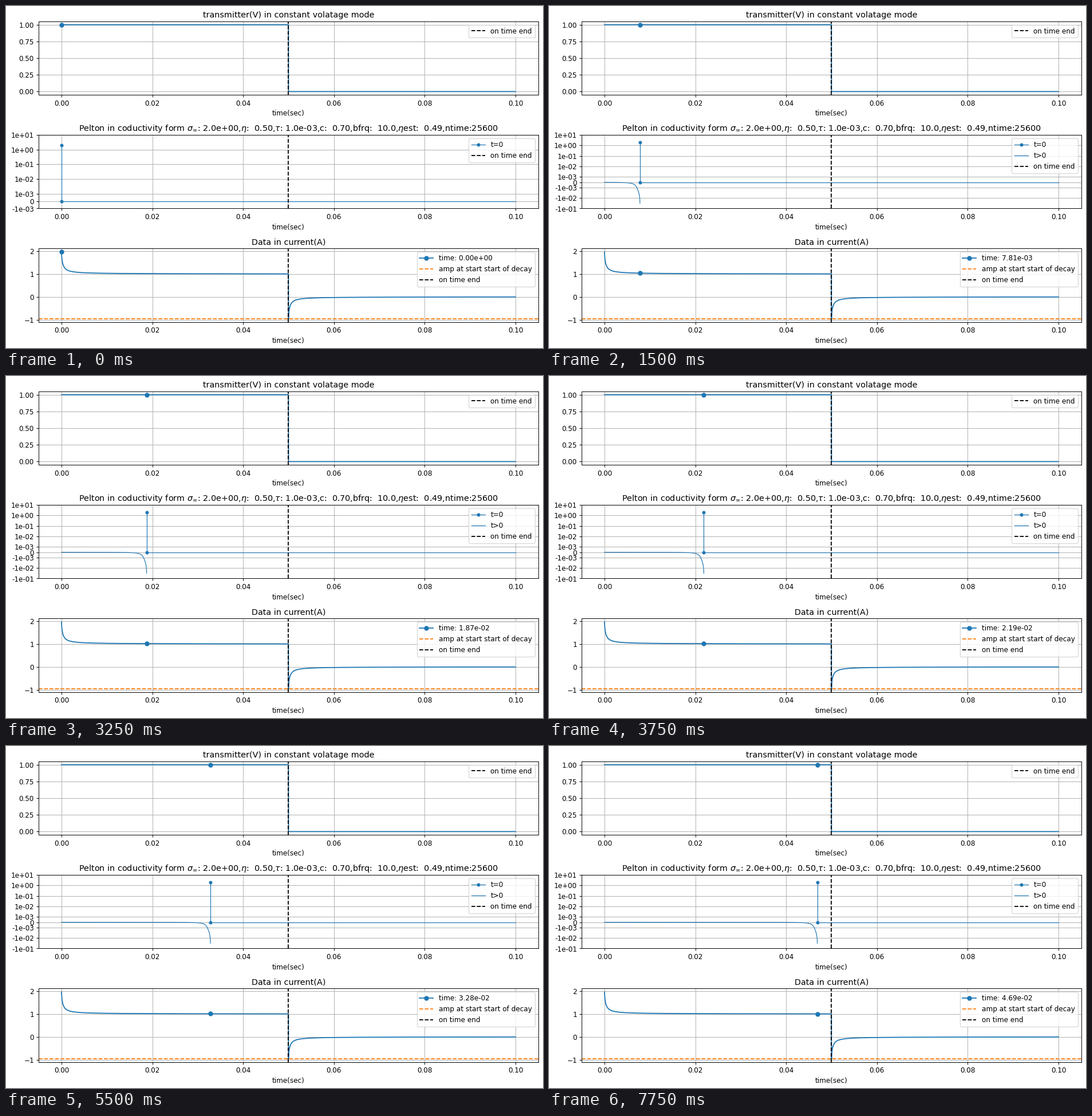
These frames come from a looping animation (938x597 px, 8000 ms). A matplotlib script:

```python
import numpy as np
import matplotlib.pyplot as plt
from matplotlib.animation import FuncAnimation
from matplotlib.ticker import FuncFormatter

WIDTH, HEIGHT, DPI = 938, 597, 86.2
FRAMES, INTERVAL = 32, 250

# Pelton model and sampling
SIGMA, ETA, TAU, C = 2.0, 0.5, 1e-3, 0.7
FREQ, N = 10.0, 25600
STRIDE = N // 64
DT = 1 / (FREQ * N)
T_OFF = 0.5 / FREQ


def step_response(count):
    """Cell-averaged step response, as a sum of exponential relaxations."""
    tau = TAU * (1 - ETA) ** (1 / C)
    du = 0.2
    u = np.arange(-30, 30, du)
    rate = np.exp(u) * DT / tau
    angle = C * np.pi
    weight = np.sin(angle) / np.pi / (2 * np.cosh(C * u) + 2 * np.cos(angle)) * du
    weight = weight * -np.expm1(-rate) / rate
    decay = np.exp(-np.outer(np.arange(count), rate)) @ weight
    return SIGMA * (1 - ETA * (1 - decay))


t = np.arange(N) / (FREQ * N)
step = step_response(N)
impulse = np.diff(step, prepend=0)
voltage = np.where(t < T_OFF, 1.0, 0.0)
current = step.copy()
current[N // 2:] -= step[:N // 2]
start_of_decay = current.min()
eta_est = -start_of_decay / current[0]

plt.rcParams["font.family"] = "DejaVu Sans"
fig = plt.figure(figsize=(WIDTH / DPI + 1e-6, HEIGHT / DPI + 1e-6), dpi=DPI)


def add_panel(top, title):
    left, width, height = 57.3, 872.3, 128.4
    ax = fig.add_axes([left / WIDTH, 1 - (top + height) / HEIGHT,
                       width / WIDTH, height / HEIGHT])
    ax.set_title(title)
    ax.set_xlabel("time(sec)")
    ax.set_xlim(-0.005, 0.105)
    ax.grid(True)
    return ax


def mark_off_time(ax):
    return ax.axvline(T_OFF, color="k", ls="--", label="on time end")


ax_v = add_panel(26.8, "transmitter(V) in constant volatage mode")
ax_k = add_panel(225.1, rf"Pelton in coductivity form $\sigma_\infty$: {SIGMA:.1e},"
                 rf"$\eta$: {ETA:5.2f},$\tau$: {TAU:.1e},c: {C:5.2f},"
                 rf"bfrq: {FREQ:5.1f},$\eta$est: {eta_est:5.2f},ntime:{N}")
ax_i = add_panel(423.5, "Data in current(A)")

volt_line, = ax_v.plot(t, voltage, marker="o", markevery=[0])
mark_off_time(ax_v)
ax_v.legend(loc="upper right")

ax_k.set_yscale("symlog", linthresh=1e-3, linscale=0.45)
ax_k.yaxis.set_major_formatter(
    FuncFormatter(lambda v, _: f"{v:.0e}" if v else "0"))
spike, = ax_k.plot([], [], "o-", color="C0", lw=1, ms=4, label="t=0")
tail, = ax_k.plot([], [], color="C0", lw=1, label="t>0")
rest, = ax_k.plot([], [], color="C0", lw=1)
kernel_off = mark_off_time(ax_k)

curr_line, = ax_i.plot(t, current, marker="o", markevery=[0], label="time: 0.00e+00")
ax_i.axhline(start_of_decay, color="C1", ls="--", label="amp at start start of decay")
mark_off_time(ax_i)
time_text = ax_i.legend(loc="upper right").get_texts()[0]


def update(frame):
    n = max(frame - 1, 0) * STRIDE
    now = t[n]
    for line in (volt_line, curr_line):
        line.set_markevery([n])
    time_text.set_text(f"time: {now:.2e}")

    spike.set_data([now, now], [0, impulse[0]])
    tail.set_data(t[:n], impulse[n:0:-1])
    rest.set_data([now, t[-1]], [0, 0])

    lowest = -1 if n else -3
    ticks = [-10.0 ** p for p in range(lowest, -4, -1)] + [0]
    ticks += [10.0 ** p for p in range(-3, 2)]
    ax_k.set_yticks(ticks)
    ax_k.set_ylim(ticks[0], ticks[-1])
    handles = [spike, tail, kernel_off] if n else [spike, kernel_off]
    ax_k.legend(handles=handles, loc="upper right")


anim = FuncAnimation(fig, update, frames=FRAMES, interval=INTERVAL,
                     repeat=True, repeat_delay=0, blit=False)
plt.show()
```
